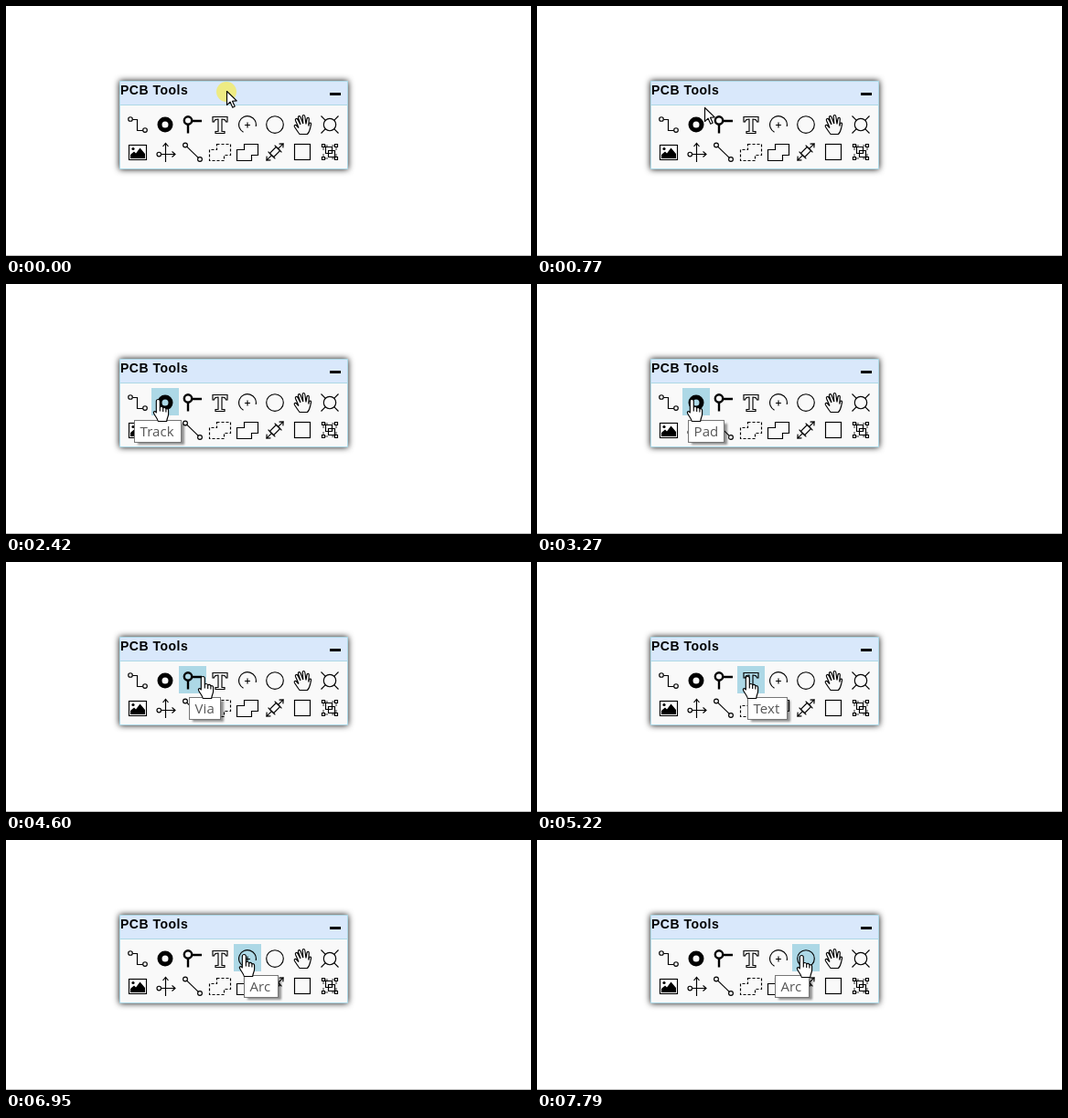
Write an HTML page that moves like this. It is 574 px wide and 274 px high and loops after 8000 ms.

```html
<!DOCTYPE html>
<html lang="en">
<head>
<meta charset="utf-8">
<title>Tool palette</title>
<style>
  html, body { margin: 0; width: 100%; height: 100%; overflow: hidden; background: #fff; }
  svg { display: block; }
  .shadow { filter: drop-shadow(0 0 3.5px rgba(0, 0, 0, .95)); }
  .title { font: bold 14px "Liberation Sans", Arial, sans-serif; letter-spacing: .5px; }
  .icons { fill: none; stroke: #000; stroke-width: 1.15; }
  .solid { fill: #000; stroke: none; }
  #tip rect { fill: #fff; stroke: #767676; }
  #tip .drop { fill: #000; fill-opacity: .42; stroke: none; filter: blur(1px); }
  #tip text { font: 15px "Open Sans", "Noto Sans", sans-serif; fill: #575757; letter-spacing: .1px; }
  .cursor { fill: #fff; stroke: #000; stroke-width: 1.15; stroke-linejoin: round; }
</style>
</head>
<body>
<svg width="574" height="274" viewBox="0 0 574 274">
  <rect y="273" width="574" height="1" fill="#bfbfbf"/>

  <rect class="shadow" x="124" y="82" width="250" height="97" fill="#f9f9f9"/>
  <rect x="124" y="82" width="250" height="26" fill="#d9e8fb"/>
  <path d="M124 108.5H374M124.5 82V179M373.5 82V179M124 82.5H374M124 178.5H374" stroke="#add8e6"/>
  <text class="title" x="125" y="97">PCB Tools</text>
  <rect x="354" y="95" width="12" height="3"/>

  <rect id="hover" y="114" width="30" height="30" fill="#add8e6"/>

  <g class="icons">
    <!-- track, pad, via -->
    <circle cx="136" cy="124" r="2.3"/><circle cx="152" cy="136" r="2.3"/>
    <path d="M138.5 124.5H143.5V136.5H149.5"/>
    <circle cx="174" cy="130" r="6" stroke-width="5"/>
    <g stroke-width="2.4"><circle cx="199" cy="125.5" r="4.2"/><path d="M203 126H214M199 130V139.5"/></g>
    <!-- text, arc, circle -->
    <path d="M226 121.5H242V127H240.5Q240 124 236 124V137.5H239V139.5H229V137.5H232V124Q228 124 227.5 127H226Z"/>
    <path d="M259.5 138.3A9.4 9.4 0 1 1 273.2 132M261 130.5H267M264 127.5V133.5"/>
    <circle cx="294" cy="130" r="9.3"/>
    <!-- open hand, hole -->
    <path d="M321 140.5C319 138 317.500 135.500 315.500 132.500C314.500 130.500 316.500 129.500 318 131.500L320 133.500L316.500 125.500C315.800 123.500 318 122.500 319 124.500L322 130L319.500 122.500C319 120.500 321.300 119.800 322 121.800L324.800 129L324.200 121C324.200 119 326.500 119 326.800 121L328 129.300L329 123.500C329.500 121.700 331.500 122.200 331.300 124L330.800 131.500L331.500 129C332.300 127.300 334 128 333.500 130C332.500 134 332.500 137.500 329.500 140.500Z"/>
    <circle cx="354" cy="130" r="6.7"/>
    <path d="M344.500 120.500L349.300 125.300M363.500 120.500L358.700 125.300M344.500 139.500L349.300 134.700M363.500 139.500L358.700 134.700"/>
    <!-- picture, origin, line -->
    <rect x="134.500" y="152.500" width="19" height="16" fill="#fff"/>
    <g class="solid"><path d="M136 167V163L140 159.500L142 161.500L146.500 155.500L152 162V167Z"/><circle cx="139" cy="156.500" r="1.600"/></g>
    <path d="M174.500 151V171M171.500 154L174.500 150.500L177.500 154M169.500 162.500H185M181.500 159.500L185 162.500L181.500 165.500"/>
    <circle cx="167.300" cy="162.500" r="2.300"/>
    <circle cx="196" cy="152.500" r="2.400"/><circle cx="212" cy="168" r="2.400"/><path d="M197.700 154.200L210.300 166.300"/>
    <!-- dashed and solid outlines -->
    <path id="outline" d="M260.500 151.500H275.500V163.500H268.500V169.500H252.500V157.500H260.500Z"/>
    <use href="#outline" x="-30" stroke-dasharray="3 2"/>
    <!-- dimension, square, group -->
    <g transform="translate(294 160) rotate(-45)">
      <path d="M-13 0H-5M5 0H13M-9.500 -3L-13 0L-9.500 3M9.500 -3L13 0L9.500 3M-5 -5.500V5.500M5 -5.500V5.500"/>
      <rect x="-5" y="-3" width="10" height="6"/>
    </g>
    <rect x="315.500" y="151.500" width="17" height="17"/>
    <path d="M345.500 151.500h3v3h-3zM359.500 151.500h3v3h-3zM345.500 165.500h3v3h-3zM359.500 165.500h3v3h-3zM349.500 154.500h7v7h-7zM352.500 158.500h7v7h-7z"/>
    <path d="M348.500 153H352M356 153H359.500M348.500 167H352M356 167H359.500M347 154.500V158M347 162V165.500M361 154.500V158M361 162V165.500" stroke-width=".8"/>
  </g>

  <g id="tip">
    <rect class="drop" x="4" y="4" height="23"/>
    <rect x=".5" y=".5" height="24"/>
    <text x="6.500" y="18"></text>
  </g>

  <circle id="halo" cx="241" cy="94" r="11" fill="#f0ea78" fill-opacity=".92"/>
  <path id="arrow" class="cursor" d="M0 0V15L3.600 11.700L6.300 17.700L8.700 16.600L6 10.700L10.700 10.400Z"/>
  <path id="hand" class="cursor" d="M-2.200 14.500V2a2 2 0 0 1 4 0V9.200c0-1.600 3.200-1.800 3.400 .6c.6-1.400 3-1.200 3.200 .9c.8-1 2.700-.6 2.700 1.300V16c0 3-1.600 4-1.900 8H-.2c-.5-3-2.500-4.500-4.500-8.200C-6 13.400-4 12-2.200 14.500ZM1.800 9v4M5.200 10v3.500M8.400 11v3"/>
</svg>
<script>
const $ = id => document.getElementById(id);
const LOOP = 8000, TICK = 78;

// Pointer waypoints: tick, x, y
const path = [
  [6, 241, 93], [13, 140, 124.5], [25, 140, 124.5], [31, 165.5, 125.5],
  [41, 165.5, 125.5], [42, 169, 125.5], [46, 200, 124.5], [58, 200, 124.5],
  [59, 215, 124.5], [63, 230, 124.5], [78, 230, 124.5], [82, 251, 124.5],
  [85, 260, 124.5], [95, 260, 124.5], [100, 289, 126]
];

// Tooltips: first tick, last tick, label, x, y, width
const tips = [
  [18, 36, "Track", 140, 149, 52], [36, 50, "Pad", 165, 149, 40],
  [50, 66, "Via", 200, 148, 35], [67, 89, "Text", 230, 148, 44],
  [89, 999, "Arc", 260, 148, 38]
];

function pointer(n) {
  const i = path.findIndex(p => p[0] >= n);
  if (i < 0) return path[path.length - 1].slice(1);
  if (i === 0) return path[0].slice(1);
  const [a, x, y] = path[i - 1], [b, u, v] = path[i];
  const k = (n - a) / (b - a);
  return [x + (u - x) * k, y + (v - y) * k];
}

const show = (el, on) => el.setAttribute("visibility", on ? "visible" : "hidden");
const place = (el, x, y) => el.setAttribute("transform", `translate(${x} ${y})`);

function drawTip(n) {
  const tip = tips.find(([from, to]) => n >= from && n < to);
  show($("tip"), tip);
  if (!tip) return;
  const [, , label, x, y, width] = tip;
  const [drop, box, text] = $("tip").children;
  place($("tip"), x, y);
  drop.setAttribute("width", width - 1);
  box.setAttribute("width", width - 1);
  text.textContent = label;
  $("tip").setAttribute("opacity", n === 18 ? .35 : n === 19 ? .7 : 1);
}

function draw(now) {
  const n = Math.floor((now % LOOP + 16) / TICK);
  const [x, y] = pointer(n).map(Math.round);
  const over = y >= 114;
  show($("hover"), over);
  $("hover").setAttribute("x", 129 + 30 * Math.floor((x - 129) / 30));
  show($("halo"), n < 7);
  show($("arrow"), !over);
  show($("hand"), over);
  place($("arrow"), x + .5, y + .5);
  place($("hand"), x + .5, y + .5);
  drawTip(n);
}

const start = performance.now();
function loop() {
  draw(performance.now() - start);
  requestAnimationFrame(loop);
}
loop();
</script>
</body>
</html>
```
